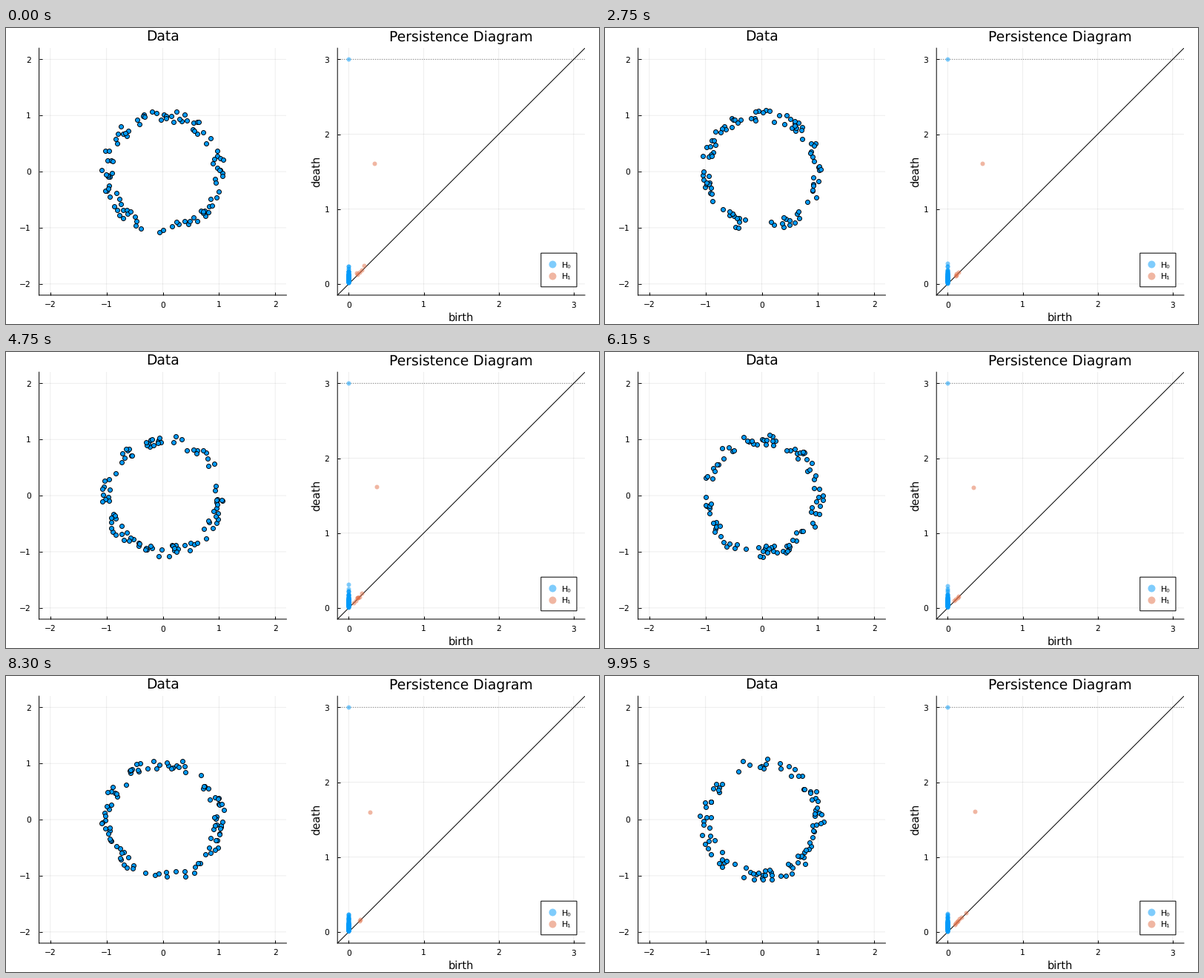
These frames come from a looping animation (800x400 px, 10000 ms). A matplotlib script:

```python
import numpy as np
import matplotlib.pyplot as plt
from matplotlib.animation import FuncAnimation
from matplotlib.patches import Rectangle

W, H, DPI = 800, 400, 100
PX = 72 / DPI  # points per pixel
FRAMES, INTERVAL = 200, 50
N = 100
BLUE, ORANGE = "#009afa", "#e26f46"

plt.rcParams["font.family"] = "DejaVu Sans"
plt.rcParams["text.hinting"] = "none"


def noisy_circle(rng):
    angle = rng.uniform(0, 2 * np.pi, N)
    radius = rng.uniform(0.9, 1.1, N)
    return np.column_stack([radius * np.cos(angle), radius * np.sin(angle)])


I, J = np.triu_indices(N, 1)


def persistence(points):
    """Vietoris-Rips persistence: H0 deaths and H1 (birth, death) pairs."""
    dist = np.hypot(*(points[I] - points[J]).T)
    order = np.argsort(dist)
    length = dist[order].tolist()
    rank = np.zeros((N, N), int)
    rank[I[order], J[order]] = rank[J[order], I[order]] = np.arange(len(order))
    rank = rank.tolist()

    near = [0] * N  # neighbours of each vertex as a bit mask
    group = list(range(N))
    pivots, h0, h1 = {}, [], []
    for k, (u, v) in enumerate(zip(I[order].tolist(), J[order].tolist())):
        link = near[u] & near[v]
        near[u] |= 1 << v
        near[v] |= 1 << u
        if group[u] != group[v]:
            h0.append(length[k])
            old, new = group[u], group[v]
            group = [new if g == old else g for g in group]
            continue
        # One triangle per connected part of the link is enough for H1
        while link:
            w = link.bit_length() - 1
            todo = 1 << w
            link ^= todo
            while todo and link:
                x = todo.bit_length() - 1
                todo ^= 1 << x
                found = near[x] & link
                link ^= found
                todo |= found
            column = 1 << k ^ 1 << rank[u][w] ^ 1 << rank[v][w]
            while column:
                low = column.bit_length() - 1
                if low not in pivots:
                    pivots[low] = column
                    if low < k:
                        h1.append((length[low], length[k]))
                    break
                column ^= pivots[low]
        if h1 and h1[-1][1] > 1:  # the big loop is filled
            break
    return h0, h1


def make_axes(left, limits, ticks):
    side = 333.8
    ax = fig.add_axes([left / W, 1 - 361 / H, side / W, side / H])
    ax.set(xlim=limits, ylim=limits, xticks=ticks, yticks=ticks)
    ax.patch.set_visible(False)
    ax.spines[["top", "right"]].set_visible(False)
    ax.spines[["left", "bottom"]].set_linewidth(PX)
    ax.tick_params(direction="in", length=4 * PX, width=PX, labelsize=10.67 * PX)
    ax.tick_params(axis="x", pad=8 * PX)
    ax.tick_params(axis="y", pad=11 * PX)
    ax.set_axisbelow(True)
    ax.grid(color="black", alpha=0.07, linewidth=PX)
    # Keep lines at their true subpixel places
    lines = [*ax.spines.values(), *ax.get_xgridlines(), *ax.get_ygridlines(),
             *ax.get_xticklines(), *ax.get_yticklines()]
    for line in lines:
        line.set_snap(False)
    return ax


def scatter(color):
    return diagram_ax.scatter([], [], s=(6 * PX) ** 2, color=color, alpha=0.5,
                              linewidths=0, zorder=3, snap=False)


fig = plt.figure(figsize=(W / DPI, H / DPI), dpi=DPI, facecolor="white")
data_ax = make_axes(44.6, (-2.2, 2.2), range(-2, 3))
diagram_ax = make_axes(447.2, (-0.15, 3.15), range(4))

cloud, = data_ax.plot([], [], "o", color=BLUE, markersize=6 * PX, snap=False,
                      markeredgecolor="black", markeredgewidth=0.95 * PX)

diagram_ax.plot([-0.15, 3.15], [-0.15, 3.15], color="black", linewidth=PX)
diagram_ax.axhline(3, color="black", alpha=0.5, linewidth=PX,
                   linestyle=(0, (1, 2)), snap=False)
h0_dots, h1_dots = scatter(BLUE), scatter(ORANGE)

# Titles, labels and legend, placed in pixels
page = fig.add_axes([0, 0, 1, 1])
page.set(xlim=(0, W), ylim=(H, 0))
page.axis("off")


def write(x, y, text, size, **style):
    style = {"ha": "center", "va": "baseline", **style}
    page.text(x, y, text, fontsize=size * PX, **style)


write(211.5, 18, "Data", 18.8)
write(614, 18, "Persistence Diagram", 18.8)
write(614, 396, "birth", 14.67)
write(423, 194, "death", 14.67, rotation=90, rotation_mode="anchor")

page.add_patch(Rectangle((721.8, 304.2), 48.2, 45.6, facecolor="white",
                         edgecolor="black", linewidth=PX, snap=False))
for y, color, label in [(319.4, BLUE, "H₀"), (334.6, ORANGE, "H₁")]:
    page.plot(736.7, y, "o", color=color, alpha=0.5, markersize=10 * PX,
              markeredgewidth=0, snap=False)
    write(750, y + 4, label, 11, ha="left")

rng = np.random.default_rng(7)
clouds = [noisy_circle(rng) for _ in range(FRAMES)]
diagrams = [persistence(points) for points in clouds]


def draw(n):
    h0, h1 = diagrams[n]
    cloud.set_data(*clouds[n].T)
    h0_dots.set_offsets([(0, death) for death in h0 + [3]])
    h1_dots.set_offsets(h1)
    return cloud, h0_dots, h1_dots


anim = FuncAnimation(fig, draw, frames=FRAMES, interval=INTERVAL,
                     repeat=True, repeat_delay=0)
plt.show()
```
